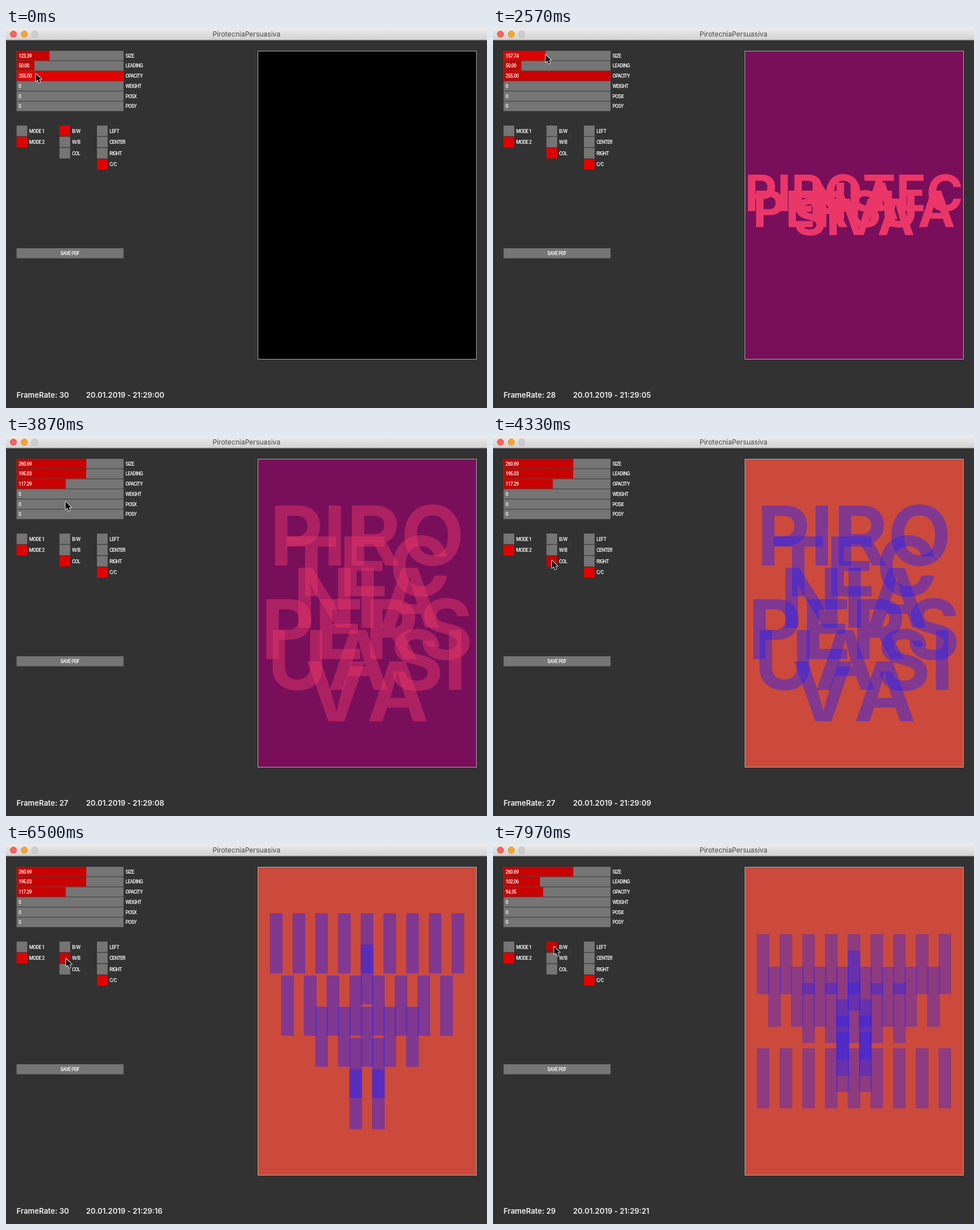
Recreate the animation shown at these times as an HTML page with a canvas. Size 841 px wide and 666 px high, loop 8000 ms.

```html
<!DOCTYPE html>
<html lang="it">
<head>
<meta charset="utf-8">
<title>PirotecniaPersuasiva</title>
<style>
html, body { margin: 0; width: 100%; height: 100%; overflow: hidden; background: #323232; }
canvas { display: block; width: 841px; height: 666px; }
</style>
</head>
<body>
<canvas id="stage"></canvas>
<script>
const W = 841, H = 666, LOOP = 8000;
const canvas = document.getElementById('stage');
const ctx = canvas.getContext('2d');
const dpr = window.devicePixelRatio || 1;
canvas.width = W * dpr;
canvas.height = H * dpr;

const GREY = '#757575', RED = '#c80000', BRIGHT = '#e10000';
const PANEL = { x: 440, y: 40, w: 383, h: 541 };
const MID_X = 631.2, MID_Y = 310.6;
const EM = 0.5545, LEAD = 0.28, CAP = 0.728;
const BAR = { w: 0.153, step: 0.2747 };

const WORDS = 'PIROTECNIA PERSUASIVA';
const WORD_KEYS = [[70, 800, 11], [900, 1320, 6], [1570, 1780, 4]];
const BARS = [10, 8, 5, 2, 2, 2, 9].map(n => 'I'.repeat(n)).join('\n');
const BAR_KEYS = [[5020, 5440, 7], [5500, 6485, 24], [6540, 7080, 13]];
const CLEAR = 4930;

// Tracks: [time, value, ...]
const SIZE = [[2460, 123.39], [2800, 260.69]];
const LEADING = [[2930, 50], [3150, 195.03], [7090, 195.03], [7430, 102.06]];
const OPACITY = [[3400, 255], [3430, 209], [3750, 117.29], [7600, 117.29], [7740, 94.35]];
const POINTER = [
  [1970, 52, 80], [2150, 103, 218], [2230, 103, 218], [2420, 75.5, 46], [2460, 75.5, 46],
  [2800, 140.4, 48], [2900, 49.7, 66], [2930, 49.7, 66], [3150, 140.4, 67], [3280, 171.5, 84],
  [3430, 171.5, 84], [3750, 104.5, 86], [3780, 104.5, 86], [4080, 103, 218], [4430, 103, 218],
  [4490, 105, 201], [6800, 105, 201], [7050, 140.4, 66], [7090, 140.4, 66], [7430, 82.1, 66],
  [7560, 104.5, 83], [7600, 104.5, 83], [7740, 87.7, 84], [7880, 107, 180]
];
const CLOCK = [[0, 0.2], [1330, 3.2], [3300, 7.3], [4330, 9.4], [4480, 10], [4930, 11],
  [5470, 12.4], [6500, 16.4], [8000, 21.4]];
const RATE = [[0, 30], [300, 29], [600, 30], [2100, 29], [2500, 28], [2900, 27],
  [4480, 28], [5100, 29], [5400, 30], [6800, 29]];
const PALETTE = [[0, 2190], [2190, 4200], [4200, LOOP]];
const COLOURS = [['#000', '#fff'], ['#790f5b', '#ea3768'], ['#cb4a3c', '#2823f5']];
const COLOUR_MODE = [[0, 0], [2190, 2], [4470, 1], [7920, 0]];

const linear = p => p;
const smooth = p => p * p * (3 - 2 * p);

function track(keys, t, ease = smooth) {
  const i = keys.findIndex(k => k[0] > t);
  if (i === 0) return keys[0].slice(1);
  if (i < 0) return keys[keys.length - 1].slice(1);
  const a = keys[i - 1], b = keys[i];
  const p = ease((t - a[0]) / (b[0] - a[0]));
  return a.slice(1).map((v, n) => v + (b[n + 1] - v) * p);
}

const held = (keys, t) => keys.filter(k => k[0] <= t).pop()[1];

// Number of keys pressed by time t; each run spreads n presses from a to b
const typed = (runs, t) => runs.reduce((sum, [a, b, n]) =>
  t < a ? sum : sum + Math.min(n, Math.floor((t - a) / (b - a) * (n - 1) + 1e-6) + 1), 0);

function rect(x, y, w, h, fill) {
  ctx.fillStyle = fill;
  ctx.fillRect(x, y, w, h);
}

function text(str, x, y, font, fill = '#fff', align = 'left', spacing = 0) {
  ctx.font = font;
  ctx.fillStyle = fill;
  ctx.textAlign = align;
  ctx.letterSpacing = spacing + 'px';
  ctx.fillText(str, x, y);
  ctx.letterSpacing = '0px';
}

const label = (str, x, mid, align) =>
  text(str, x, mid + 3, '500 8.4px Roboto, sans-serif', '#fff', align, -0.6);

// Greedy wrap by words; words too long for a line are cut by letter
function wrap(str, width) {
  const rows = [];
  for (const part of str.split('\n')) {
    let row = '';
    part.split(' ').forEach((word, i) => {
      const joined = i ? row + ' ' + word : word;
      if (width(joined) <= PANEL.w) { row = joined; return; }
      if (i) rows.push(row);
      row = '';
      for (const ch of word) {
        if (width(row + ch) > PANEL.w) { rows.push(row); row = ''; }
        row += ch;
      }
    });
    rows.push(row);
  }
  return rows;
}

function drawPanel(t, size, leading, opacity) {
  const { x, y, w, h } = PANEL;
  const [back, ink] = COLOURS[PALETTE.findIndex(([a, b]) => t >= a && t < b)];
  rect(x, y, w, h, back);

  ctx.save();
  ctx.beginPath();
  ctx.rect(x, y, w, h);
  ctx.clip();
  ctx.globalAlpha = opacity / 255;
  const em = size * EM, step = leading * LEAD, cap = em * CAP;
  const bars = t >= CLEAR;
  const str = bars ? BARS.slice(0, typed(BAR_KEYS, t)) : WORDS.slice(0, typed(WORD_KEYS, t));
  const font = `700 ${em}px Inter, "Liberation Sans", sans-serif`;
  ctx.font = font;
  ctx.fontKerning = 'none';
  const width = s => bars ? s.length * em * BAR.step : ctx.measureText(s).width;
  const rows = wrap(str, width);
  const top = MID_Y - (cap + (rows.length - 1) * step) / 2;
  rows.forEach((row, i) => {
    const rowTop = top + i * step;
    if (!bars) {
      text(row, MID_X, rowTop + cap, font, ink, 'center');
      return;
    }
    const left = MID_X - width(row) / 2 + em * (BAR.step - BAR.w) / 2;
    for (let n = 0; n < row.length; n++)
      rect(left + n * em * BAR.step, rowTop, em * BAR.w, cap, ink);
  });
  ctx.restore();

  ctx.strokeStyle = '#a8a8a8';
  ctx.lineWidth = 1;
  ctx.strokeRect(x + 0.5, y + 0.5, w - 1, h - 1);
}

function drawSliders(values, px, py) {
  const names = ['SIZE', 'LEADING', 'OPACITY', 'WEIGHT', 'POSX', 'POSY'];
  const limits = [400, 300, 255];
  names.forEach((name, i) => {
    const y = 40 + i * 17.75, value = values[i];
    const over = px >= 18 && px <= 206 && py >= y && py < y + 17;
    rect(18.5, y, 187, 16.9, GREY);
    if (value) rect(18.5, y, 187 * value / limits[i], 16.9, over ? BRIGHT : RED);
    label(value ? value.toFixed(2) : '0', 22, y + 8.6);
    label(name, 209, y + 8.6);
  });
}

function drawToggles(x, names, on, px, py) {
  names.forEach((name, i) => {
    const y = 171 + i * 19.6;
    const over = px >= x && px < x + 18.7 && py >= y && py < y + 18.7;
    rect(x, y, 18.7, 18.5, i === on ? (over ? RED : BRIGHT) : GREY);
    label(name, x + 22, y + 9.6);
  });
}

function drawTitleBar() {
  const grad = ctx.createLinearGradient(0, 0, 0, 21);
  grad.addColorStop(0, '#ececec');
  grad.addColorStop(1, '#d2d2d2');
  rect(0, 0, W, 21, grad);
  rect(0, 20.5, W, 1, '#a5a5a5');
  [[13, '#fb615c', '#df4a45'], [32, '#f3a536', '#d98c22'], [50.3, '#cecece', '#b4b4b4']]
    .forEach(([x, fill, edge]) => {
      ctx.beginPath();
      ctx.arc(x, 10.8, 5.6, 0, Math.PI * 2);
      ctx.fillStyle = fill;
      ctx.fill();
      ctx.strokeStyle = edge;
      ctx.lineWidth = 0.8;
      ctx.stroke();
    });
  text('PirotecniaPersuasiva', 420.5, 15.4, '12px Inter, sans-serif', '#454545', 'center');
}

const arrow = new Path2D('M0 0V13.6L3.2 10.8L5.5 16L8 14.9L5.8 9.9H10Z');

function drawPointer(x, y) {
  ctx.save();
  ctx.translate(x, y);
  ctx.strokeStyle = '#e8e8e8';
  ctx.lineWidth = 1.8;
  ctx.lineJoin = 'round';
  ctx.stroke(arrow);
  ctx.fillStyle = '#0a0a0a';
  ctx.fill(arrow);
  ctx.restore();
}

function draw(t) {
  const [px, py] = track(POINTER, t);
  const [size] = track(SIZE, t), [leading] = track(LEADING, t), [opacity] = track(OPACITY, t);

  ctx.setTransform(dpr, 0, 0, dpr, 0, 0);
  rect(0, 0, W, H, '#323232');
  drawTitleBar();
  drawSliders([size, leading, opacity, 0, 0, 0], px, py);
  drawToggles(18.5, ['MODE 1', 'MODE 2'], 1, px, py);
  drawToggles(93.5, ['B/W', 'W/B', 'COL'], held(COLOUR_MODE, t), px, py);
  drawToggles(159, ['LEFT', 'CENTER', 'RIGHT', 'C/C'], 3, px, py);
  rect(18.5, 386, 187, 17.6, GREY);
  label('SAVE PDF', 111.5, 394.8, 'center');
  drawPanel(t, size, leading, opacity);

  const seconds = String(Math.floor(track(CLOCK, t, linear)[0] + 1e-6)).padStart(2, '0');
  const status = '600 13px Inter, sans-serif';
  text('FrameRate: ' + held(RATE, t), 18.5, 647.8, status, '#f2f2f2');
  text('20.01.2019 - 21:29:' + seconds, 140, 647.8, status, '#f2f2f2');
  drawPointer(px, py);
}

const start = performance.now();
function tick() {
  draw((performance.now() - start) % LOOP);
  requestAnimationFrame(tick);
}
tick();
</script>
</body>
</html>
```
